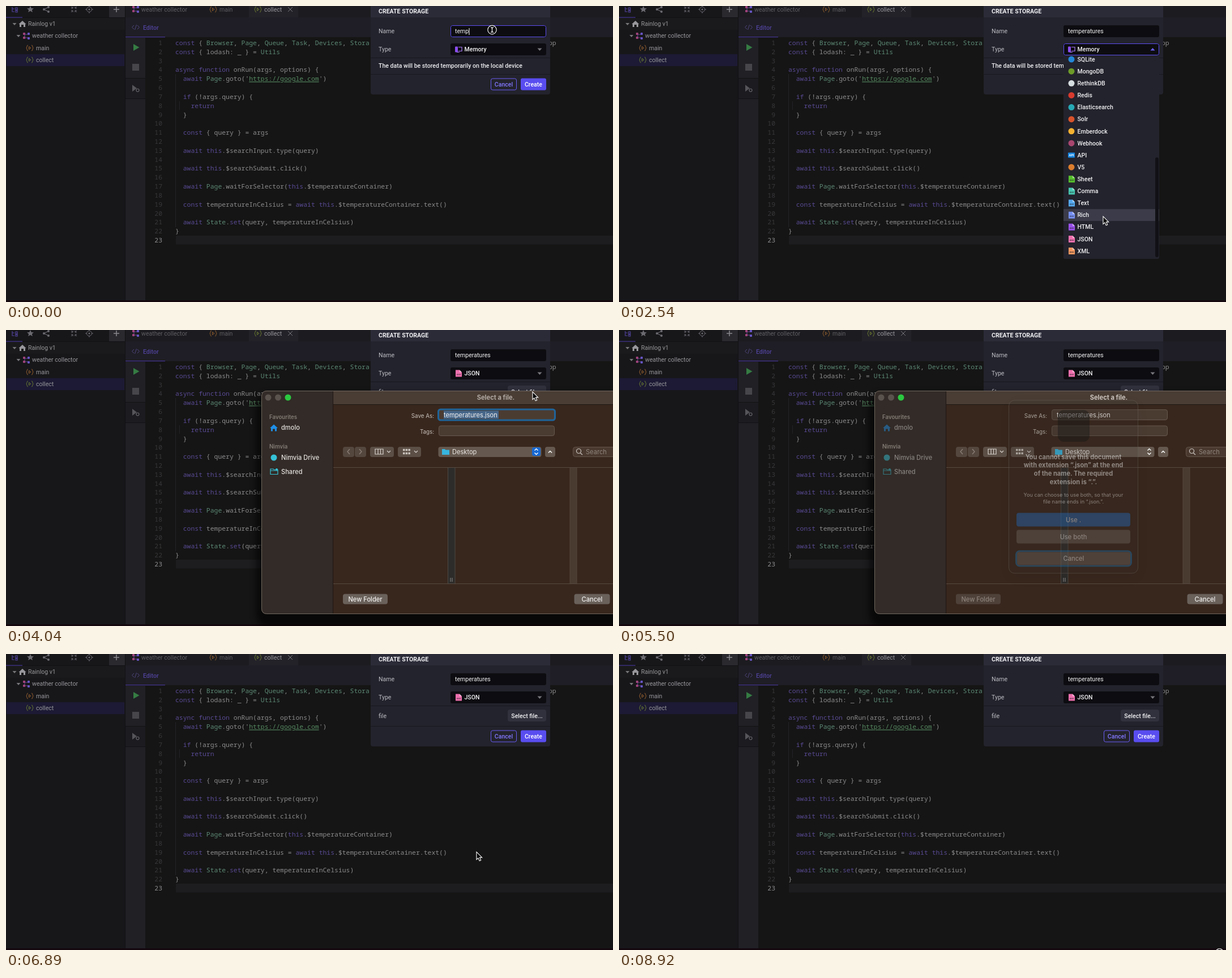
These frames come from a looping animation (1072 px wide and 522 px high, 8.98 s). An HTML page:

```html
<!DOCTYPE html>
<html lang="en">
<head>
<meta charset="utf-8">
<title>Create storage</title>
<style>
html, body { margin: 0; width: 100%; height: 100%; overflow: hidden; background: #151515; }
svg { display: block; width: 1072px; height: 522px; }
text { white-space: pre; }
.ui { font-family: Roboto, sans-serif; font-size: 10.56px; }
.mono { font-family: "Noto Sans Mono", monospace; font-size: 11.43px; }
.mac { font-family: Inter, sans-serif; font-size: 11.1px; }
</style>
</head>
<body>
<svg id="stage" viewBox="0 0 1072 522"></svg>
<script>
const LOOP = 8980;
const ROW = 21.12;
const $ = id => document.getElementById(id);

// Markup helpers
const attrs = o => Object.entries(o).map(([k, v]) => ` ${k}="${v}"`).join('');
const rect = (x, y, w, h, fill, o = {}) =>
  `<rect x="${x}" y="${y}" width="${w}" height="${h}" fill="${fill}"${attrs(o)}/>`;
const dot = (x, y, r, fill, o = {}) => `<circle cx="${x}" cy="${y}" r="${r}" fill="${fill}"${attrs(o)}/>`;
const path = (d, fill, o = {}) => `<path d="${d}" fill="${fill}"${attrs(o)}/>`;
const line = (d, stroke, w = 1, o = {}) => path(d, 'none', { stroke, 'stroke-width': w, ...o });
const text = (cls, x, y, s, fill, o = {}) =>
  `<text class="${cls}" x="${x}" y="${y}" fill="${fill}"${attrs(o)}>${s}</text>`;
const ui = (x, mid, s, fill, o) => text('ui', x, mid + 3.7, s, fill, o);
const mac = (x, mid, s, fill, o) => text('mac', x, mid + 4, s, fill, o);
const group = (id, body, o = {}) => `<g id="${id}"${attrs(o)}>${body}</g>`;
const W5 = { 'font-weight': 500 };
const MID = { 'text-anchor': 'middle' };
const END = { 'text-anchor': 'end' };

function flow(x, y) {
  return line(`M${x - 3} ${y - 3}V${y + 3}H${x + 3}M${x - 3} ${y - 3}H${x + 3}`, '#64469a') +
    [[-4, -4, '#a0437a'], [4, -4, '#6655c2'], [-4, 3, '#a0437a'], [4, 4, '#6655c2']]
      .map(([a, b, c]) => rect(x + a - 2, y + b - 2, 4, 4, c, { rx: 1 })).join('');
}

function script(x, y, c) {
  return line(`M${x - 3} ${y - 5}Q${x - 5} ${y - 5} ${x - 5} ${y - 2}L${x - 6} ${y}L${x - 5} ${y + 2}Q${x - 5} ${y + 5} ${x - 3} ${y + 5}` +
    `M${x + 3} ${y - 5}Q${x + 5} ${y - 5} ${x + 5} ${y - 2}L${x + 6} ${y}L${x + 5} ${y + 2}Q${x + 5} ${y + 5} ${x + 3} ${y + 5}` +
    `M${x - 1.5} ${y - 2.5}L${x + 2} ${y}L${x - 1.5} ${y + 2.5}Z`, c);
}

function fileIcon(x, y, c) {
  return path(`M${x - 5} ${y - 6}H${x + 2}L${x + 6} ${y - 2}V${y + 6}H${x - 5}Z`, c) +
    path(`M${x + 2} ${y - 6}V${y - 2}H${x + 6}Z`, '#fff', { opacity: .55 }) +
    line(`M${x - 3} ${y + 2}H${x + 4}`, '#23232c', 2, { 'stroke-dasharray': '1.8 .7', opacity: .65 });
}

const memoryIcon = (x, y) =>
  rect(x - 6, y - 5, 5, 10, '#8a4df0', { rx: 1 }) +
  line(`M${x} ${y - 4}H${x + 6}V${y + 3}H${x}M${x - 3} ${y + 5}H${x + 2}`, '#a77af5', 1.2);

// Editor behind the dialog
const KEY = '#594a93', TYPE = '#5c8975', PLAIN = '#8b8b8d', LABEL = '#98989c';
const code = `const { Browser, Page, Queue, Task, Devices, Stora
const { lodash: _ } = Utils

async function onRun(args, options) {
  await Page.goto('https://google.com')

  if (!args.query) {
    return
  }

  const { query } = args

  await this.$searchInput.type(query)

  await this.$searchSubmit.click()

  await Page.waitForSelector(this.$temperatureContainer)

  const temperatureInCelsius = await this.$temperatureContainer.text()

  await State.set(query, temperatureInCelsius)
}
`.split('\n');

const tint = (s, c, o = {}) => `<tspan fill="${c}"${attrs(o)}>${s}</tspan>`;
const paint = s => s.replace(
  /\b(const|async|function|await|if|return|this|set)\b|\b(Browser|Page|Queue|Task|Devices|Stora|Utils|State)\b|(https:[^']+)/g,
  (m, key, type) => key ? tint(m, KEY) : type ? tint(m, TYPE)
    : tint(m, '#568a61', { 'text-decoration': 'underline' }));

function editor() {
  let s = rect(0, 0, 1072, 522, '#151515') + rect(0, 0, 210, 522, '#17171a') +
    rect(0, 21, 210, 21, '#1a1a1c') + rect(1, 85, 208, 21, '#1c1a34') +
    rect(211, 0, 861, 20, '#1c1c20') + rect(429, 0, 87, 20, '#232229') +
    rect(211, 20, 861, 35, '#1f1e26') + rect(211, 54, 70, 1.3, '#41338c') +
    rect(211, 56, 35, 466, '#202025') + rect(211, 127, 35, 36, '#1b1b20') +
    line('M211 127.5H246M211 163.5H246', '#121215') +
    rect(182, 0, 28, 20, '#29292e') + line('M0 20.5H210M210.5 0V522', '#111114') +
    rect(0, 19.5, 29, 1.3, '#41338c');
  s += line('M11 2V10H15M11 5H15M17 3H20V7H17ZM17 8H20V11H17Z', '#52439c', 1.2) +
    path('M43 0L44.8 4L49 4.3L45.8 7L46.8 11L43 8.8L39.2 11L40.2 7L37 4.3L41.2 4Z', '#6b6b71') +
    line('M67 6L75 2M67 6L75 10', '#6b6b71', 1.2) +
    [[67, 6], [75, 2], [75, 10]].map(p => dot(...p, 2, '#6b6b71')).join('') +
    line('M115 1L118 4V1M118 4H115M125 1L122 4V1M122 4H125M115 11L118 8V11M118 8H115M125 11L122 8V11M122 8H125', '#6b6b71') +
    dot(147, 6, 4.5, 'none', { stroke: '#6b6b71' }) + dot(147, 6, 1.5, '#6b6b71') +
    line('M147 -1V2M147 10V13M140 6H143M151 6H154', '#6b6b71') +
    line('M190 6H200M195 1V11', '#8a8a8e', 1.5);
  s += path('M11.5 30H18.5L15 34Z', '#77777b') + path('M18.5 51H25.5L22 55Z', '#77777b') +
    path('M22.5 32L29 26L35.5 32H34V37H31V33H27V37H24V32Z', LABEL) + flow(36, 53) +
    script(42, 74, '#955f2e') + script(42, 95, '#687732') +
    ui(39, 31, 'Rainlog v1', LABEL) + ui(46, 52.5, 'weather collector', LABEL) +
    ui(53, 74, 'main', LABEL) + ui(53, 95, 'collect', LABEL);
  s += flow(229, 6) + script(366, 6, '#8a5a2c') + script(445, 6, '#6a7a30') +
    ui(239, 6, 'weather collector', '#5f5f63') + ui(377, 6, 'main', '#5f5f63') + ui(456, 6, 'collect', LABEL) +
    line('M498 2L506 10M506 2L498 10', '#77777b') +
    line('M226 34L222.5 37.5L226 41M232 34L235.5 37.5L232 41M230.5 33L227.5 42', '#51467f') +
    ui(242, 38, 'Editor', '#50439c', W5) +
    path('M225 67L235.5 73L225 79Z', '#357b43') + rect(223, 102, 12, 12, '#46464b') +
    path('M223 139L231 145L223 151Z', '#55555a') + dot(232.5, 148.5, 2.5, 'none', { stroke: '#66666b', 'stroke-width': 1.2 });
  s += rect(300, 405, 772, 15.5, '#1d1d20') + line('M299.5 120V390M306.5 168V183', '#242426');
  code.forEach((src, i) => {
    const y = 69 + i * 15.82, last = i === 22;
    s += text('mono', 276, y, i + 1, last ? '#8d8d90' : '#38383b', END) +
      text('mono', 299, y, paint(src), PLAIN);
  });
  return s + text('mono', 958, 69, 'pp', PLAIN) + rect(0, 519, 1072, 3, '#14080e');
}

// Storage form
const items = [
  ['SQLite', '#2388d8'], ['MongoDB', '#6d9b28'], ['RethinkDB', '#d6dde0'], ['Redis', '#d83a2e'],
  ['Elasticsearch', '#27a9b5'], ['Solr', '#d8532b'], ['Emberdock', '#f5b231'], ['Webhook', '#a8466f'],
  ['API', '#1686e0'], ['V5', '#dc7d2d'], ['Sheet', '#57bf2d', 1], ['Comma', '#48c6b0', 1], ['Text', '#55a9ee', 1],
  ['Rich', '#7791f2', 1], ['HTML', '#9a51ea', 1], ['JSON', '#ef70ae', 1], ['XML', '#f0965f', 1]
];

function row([name, c, file], mid) {
  const icon = file ? fileIcon(799, mid, c)
    : name === 'API' ? rect(793, mid - 4.5, 12, 9, c, { rx: 1 }) +
      text('ui', 799, mid + 2, 'API', '#fff', { ...MID, style: 'font-size:5.5px;font-weight:700' })
    : dot(799, mid, 5.5, c);
  return icon + ui(809.5, mid, name, '#efeff2', W5);
}

function form() {
  const list = [0, 1].map(page => items.map((it, i) =>
    row(it, 432 - (16 - i) * ROW - page * 17 * ROW)).join('')).join('');
  return rect(644, -10, 317, 166, '#23232d', { id: 'card', rx: 4 }) + rect(644, 0, 317, 20, '#2b2b38') +
    ui(658, 9.5, 'CREATE STORAGE', '#f0f0f3', { 'font-weight': 700 }) +
    line('M644 91.5H961', '#181820') +
    ui(658, 44.5, 'Name', '#bdbdc4') + ui(658, 76.5, 'Type', '#bdbdc4') +
    rect(785, 34, 169, 21, '#0d0d11', { rx: 3 }) +
    rect(785.5, 34.5, 168, 20, 'none', { id: 'nameRing', rx: 3, stroke: '#5c4df0' }) +
    ui(793, 44.5, '', '#f3f3f5', { id: 'name' }) + rect(0, 39, 1, 12, '#fff', { id: 'caret' }) +
    rect(785, 66, 169, 21, '#0d0d11', { rx: 3 }) +
    rect(785.5, 66.5, 168, 20, 'none', { id: 'typeRing', rx: 3, stroke: '#5c4df0' }) +
    group('memory', memoryIcon(799, 76.5) + ui(809.5, 76.5, 'Memory', '#f3f3f5', W5) +
      ui(658, 105.5, 'The data will be stored temporarily on the local device', '#ececf0', W5)) +
    group('json', row(items[15], 76.5) + ui(658, 109, 'file', '#bdbdc4') +
      rect(886, 98, 68, 21, '#31313d', { rx: 4 }) + ui(920, 109, 'Select file...', '#f0f0f3', { ...MID, ...W5 })) +
    path('', '#77777d', { id: 'chevron' }) +
    group('footer', line('M644 120.5H961', '#181820') +
      rect(856.5, 128, 45, 20, 'none', { rx: 3, stroke: '#6a5cf5' }) + ui(879, 138, 'Cancel', '#8378ff', { ...MID, ...W5 }) +
      rect(909, 127.5, 45, 21, '#594df0', { id: 'create', rx: 3 }) + ui(931.5, 138, 'Create', '#fff', { ...MID, ...W5 })) +
    group('menu', rect(785, 87, 169, 359, '#23232d') + rect(785, 0, 169, 21, '#3b3b49', { id: 'hover' }) +
      group('list', list) + rect(947, 267, 6, 176, '#111116', { id: 'thumb', rx: 3 }), { 'clip-path': 'url(#menuClip)' });
}

// Save panel
const button = (x, y, w, h, label, o = {}) =>
  rect(x, y, w, h, '#6a615b', { rx: 4, ...o }) + mac(x + w / 2, y + h / 2, label, '#f2f0ee', { ...MID, ...W5 });
const field = (x, y, w, h) => rect(x + .5, y + .5, w - 1, h - 1, '#4b3c32', { rx: 3.5, stroke: '#66584e' });
const chevrons = (x, y) => line(`M${x - 3} ${y - 2}L${x} ${y - 5}L${x + 3} ${y - 2}M${x - 3} ${y + 2}L${x} ${y + 5}L${x + 3} ${y + 2}`, '#fff', 1.4);

function panel() {
  const head = { 'font-weight': 600, style: 'font-size:9.7px' };
  const label = { ...END, style: 'font-size:9.8px' };
  let s = rect(442, 112, 700, 412, '#000', { rx: 22, opacity: .6, filter: 'url(#blur)' }) +
    rect(451, 107, 680, 394, '#38271d', { rx: 10 }) +
    path('M461 107H577V501H461Q451 501 451 491V117Q451 107 461 107Z', '#322b27') +
    rect(577, 107, 495, 24, '#493d34') + line('M577 131.5H1072M577.5 107V501', '#1e1713');
  s += mac(756, 150.5, 'Save As:', '#c8c1bb', label) + mac(756, 179, 'Tags:', '#c8c1bb', label) +
    field(764, 140, 205, 19) + field(764, 168.5, 205, 18.5) +
    group('focus', rect(763.5, 140, 206, 19, 'none', { rx: 4, stroke: '#1f6499', 'stroke-width': 3 })) +
    rect(773, 142.5, 97, 14, '#466689', { id: 'selection' }) +
    mac(773, 150, 'temperatures.json', '#f5f2f0');
  s += rect(595, 206, 20, 18, '#54473e', { rx: 4 }) + rect(616, 206, 20, 18, '#54473e', { rx: 4 }) +
    line('M607 210L603 214.5L607 219M624 210L628 214.5L624 219', '#8b8078', 1.3) +
    rect(643, 206, 42, 18, '#5b4f46', { rx: 4 }) + rect(692, 206, 41, 18, '#5b4f46', { rx: 4 }) +
    line('M652 210H666V219H652ZM657 210V219M661.5 210V219M673 213L676 216L679 213M721 213L724 216L727 213', '#d9d3ce', 1.2) +
    line('M701 211.5H714M701 217.5H714', '#c9c2bc', 3.5, { 'stroke-dasharray': '3.5 1.2' }) +
    rect(763.5, 206, 182, 18, '#65594f', { rx: 4 }) +
    path('M770 210H775L776.5 211.5H783V220H770Z', '#38b6df') + mac(788, 214.5, 'Desktop', '#ebe7e4') +
    rect(929, 207, 15, 15, '#1768d2', { id: 'stepper', rx: 3.5 }) + chevrons(936.5, 214.5) +
    rect(952, 206, 18, 18, '#65594f', { rx: 4 }) + line('M958 216.5L961 213.5L964 216.5', '#fff', 1.5) +
    rect(1001.5, 206.5, 90, 17, '#49392f', { rx: 4, stroke: '#64554a' }) +
    dot(1011.5, 213.5, 4, 'none', { stroke: '#d0c9c4', 'stroke-width': 1.2 }) + line('M1014.5 217L1018 220', '#d0c9c4', 1.3) +
    mac(1024, 215, 'Search', '#92867d');
  s += line('M578 242.5H1072M578 447.5H1072', '#574a40') +
    rect(780, 243, 13, 204, '#2e2c2a') + line('M780.5 243V447M793 243V447', '#4b4844') +
    rect(996, 243, 12, 204, '#4a3b30') + line('M996 243V447M1008 243V447', '#55463b') +
    line('M785 437V444M788 437V444', '#8a8a8a') +
    group('newFolder', button(595, 465.5, 79, 18, 'New Folder')) + button(1003.5, 465.5, 63, 18, 'Cancel') +
    path('M461 107H1072V501H461Q451 501 451 491V117Q451 107 461 107Z', '#140c00', { id: 'shade' });
  s += dot(463, 119, 5.5, '#5a524d') + dot(480.5, 119, 5.5, '#5a524d') + dot(498, 119, 5.5, '#2bc840') +
    mac(865, 118.5, 'Select a file.', '#b3aaa4', { ...MID, 'font-weight': 700, id: 'title' }) +
    group('heads', mac(465, 152.5, 'Favourites', '#847c76', head) + mac(465, 205, 'Nimvia', '#847c76', head)) +
    group('places',
      path('M466 173L473 166.5L480 173H478V178.5H475V174.5H471V178.5H468V173Z', '#1f8fe8') +
      dot(473, 225, 5.5, '#36c3d8') +
      line('M467 245H472L473.5 246.5H480V254.5H467ZM467 248H480', '#36c3d8', 1.2) + dot(478, 246, 2, '#36c3d8') +
      ['dmolo', 'Nimvia Drive', 'Shared'].map((n, i) => mac(486, [172, 225, 249.5][i], n, '#e6e2df', W5)).join(''));
  return s + line('M1072 107.5H461Q451.5 107.5 451.5 117V491Q451.5 500.5 461 500.5H1072', '#71675f');
}

function alertBox() {
  const big = ['You cannot save this document', 'with extension “.json” at the end', 'of the name. The required', 'extension is “.”.'];
  const small = ['You can choose to use both, so that your', 'file name ends in “.json.”.'];
  return group('alertBack',
      rect(690, 156, 226, 306, '#000', { rx: 14, opacity: .3, filter: 'url(#soft)' }) +
      rect(688.5, 149.5, 228, 305, '#342b24', { rx: 10 })) +
    group('alertBody',
      rect(688.5, 149.5, 228, 305, 'none', { rx: 10, stroke: '#6c635a' }) +
      rect(775, 166.5, 56, 56, '#171717', { rx: 11 }) +
      big.map((s, i) => mac(802.5, 249 + i * 14.8, s, '#fff', { ...MID, 'font-weight': 700 })).join('') +
      small.map((s, i) => mac(802.5, 315 + i * 12.4, s, '#f4f1ef', { ...MID, style: 'font-size:9.1px' })).join('') +
      button(702, 348, 201, 24, 'Use .', { id: 'use' }) + button(702, 378, 201, 24, 'Use both') +
      rect(701.5, 415.5, 203, 26, 'none', { rx: 6, stroke: '#1d6ca6', 'stroke-width': 3 }) + button(703, 417, 200, 23, 'Cancel'));
}

const blur = (id, size) => `<filter id="${id}" x="-20%" y="-20%" width="140%" height="140%"><feGaussianBlur stdDeviation="${size}"/></filter>`;

$('stage').innerHTML =
  `<defs>${blur('blur', 6)}${blur('soft', 11)}
  <clipPath id="menuClip"><rect x="785" y="87" width="169" height="359" rx="3"/></clipPath></defs>` +
  editor() + form() + group('panel', panel()) + group('alert', alertBox()) +
  group('beam', line('M856 37.5Q858.5 37.5 858.5 40V44Q858.5 46.5 856 46.5M861 37.5Q858.5 37.5 858.5 40M858.5 44Q858.5 46.5 861 46.5', '#fff', 1.2)) +
  group('ring', dot(0, 0, 7.6, 'none', { stroke: '#fff', 'stroke-width': 1.2 }) + dot(0, 0, 6.3, 'none', { stroke: '#000' })) +
  group('arrow', path('M0 0V13.5L3 10.8L5.2 15.8L7.7 14.7L5.5 9.9H9.7Z', '#000', { stroke: '#fff', 'stroke-width': 1.1 }));

// Motion
const clamp = v => Math.max(0, Math.min(1, v));
const ramp = (t, a, b) => clamp((t - a) / (b - a));
const ease = p => p * p * (3 - 2 * p);
const mix = (a, b, p) => a + (b - a) * p;
const within = (t, a, b) => t >= a && t < b;
const set = (id, o) => { for (const k in o) $(id).setAttribute(k, o[k]); };
const show = (id, on) => set(id, { opacity: +on });

const keys = [60, 150, 240, 420, 520, 610, 710, 880];
const route = [
  [1600, 858, 44], [1750, 858, 77], [1900, 857, 84], [2300, 855, 371], [2540, 855, 371], [2760, 854, 410],
  [2900, 854, 410], [3410, 893, 126], [3640, 930, 109], [4100, 930, 109], [4670, 888, 396], [4730, 1044, 443],
  [4780, 1100, 470], [5700, 1100, 420], [6310, 825, 359], [6620, 825, 359], [6890, 831, 349], [7350, 839, 383],
  [7900, 930, 140], [8300, 932, 142], [8740, 1060, 527]
];

function pointer(t) {
  const i = route.findIndex(p => p[0] > t);
  if (i < 1) return null;
  const [a, b] = [route[i - 1], route[i]], p = ease(ramp(t, a[0], b[0]));
  return [mix(a[1], b[1], p), mix(a[2], b[2], p)];
}

function drawForm(t, at) {
  const json = t >= 2900, open = within(t, 1750, 2900);
  $('name').textContent = 'temperatures'.slice(0, 4 + keys.filter(k => t >= k).length);
  set('caret', { x: 793.3 + $('name').getComputedTextLength() });
  show('caret', t < 1240);
  show('nameRing', 1 - ramp(t, 1180, 1420));
  show('typeRing', json ? 0 : ramp(t, 1180, 1420));
  show('memory', !json);
  show('json', json);
  set('card', { height: json ? 173 : 166 });
  set('footer', { transform: `translate(0 ${json ? 7 : 0})` });
  set('chevron', open ? { d: 'M938.5 78.5H946.5L942.5 74Z', fill: '#6a5cf5' } : { d: 'M938.5 74.5H946.5L942.5 79Z', fill: '#77777d' });
  set('create', { fill: within(t, 7850, 8360) ? '#6b60f5' : '#594df0' });

  show('menu', open);
  if (!open) return;
  const left = 1 - ease(ramp(t, 1850, 2250));
  const shift = left * 17 * ROW, base = 432 + shift;
  set('list', { transform: `translate(0 ${shift})` });
  set('thumb', { y: 267 - left * 176 });
  set('hover', { y: base + Math.round((at[1] - base) / ROW) * ROW - 10.5, opacity: at[1] > 87 ? 1 : 0 });
}

function drawPanel(t) {
  const leave = 1 - ramp(t, 6670, 6870);
  const asked = t >= 5500, pressed = t >= 6480, idle = asked && !pressed;
  const rise = ease(ramp(t, 5500, 5740));
  show('panel', t < 3810 ? 0 : Math.min(mix(.35, 1, ramp(t, 3810, 3990)), leave));
  set('title', { fill: idle ? '#cfc7c1' : asked ? '#9a918a' : '#b3aaa4' });
  show('heads', pressed ? .7 : 1);
  show('places', idle ? .48 : 1);
  show('focus', !asked);
  show('selection', !idle);
  set('stepper', { fill: idle ? '#65594f' : '#1768d2' });
  show('newFolder', asked ? .45 : 1);
  show('shade', .3 * rise);

  show('alert', asked ? leave : 0);
  set('alert', { transform: `translate(0 ${-25.5 * (1 - rise)})` });
  show('alertBack', mix(.2, .96, rise));
  show('alertBody', mix(.45, 1, rise));
  set('use', { fill: pressed ? '#7d7570' : '#2467b5' });
}

function draw(t) {
  const at = pointer(t);
  drawForm(t, at);
  drawPanel(t);
  show('beam', t < 60);
  show('ring', t < 60 || t >= 8920);
  set('ring', { transform: t < 60 ? 'translate(858.5 42)' : 'translate(1060.5 527.5)' });
  show('arrow', !!at);
  if (at) set('arrow', { transform: `translate(${at})` });
}

const start = performance.now();
function tick() {
  draw((performance.now() - start) % LOOP);
  requestAnimationFrame(tick);
}
tick();
</script>
</body>
</html>
```
